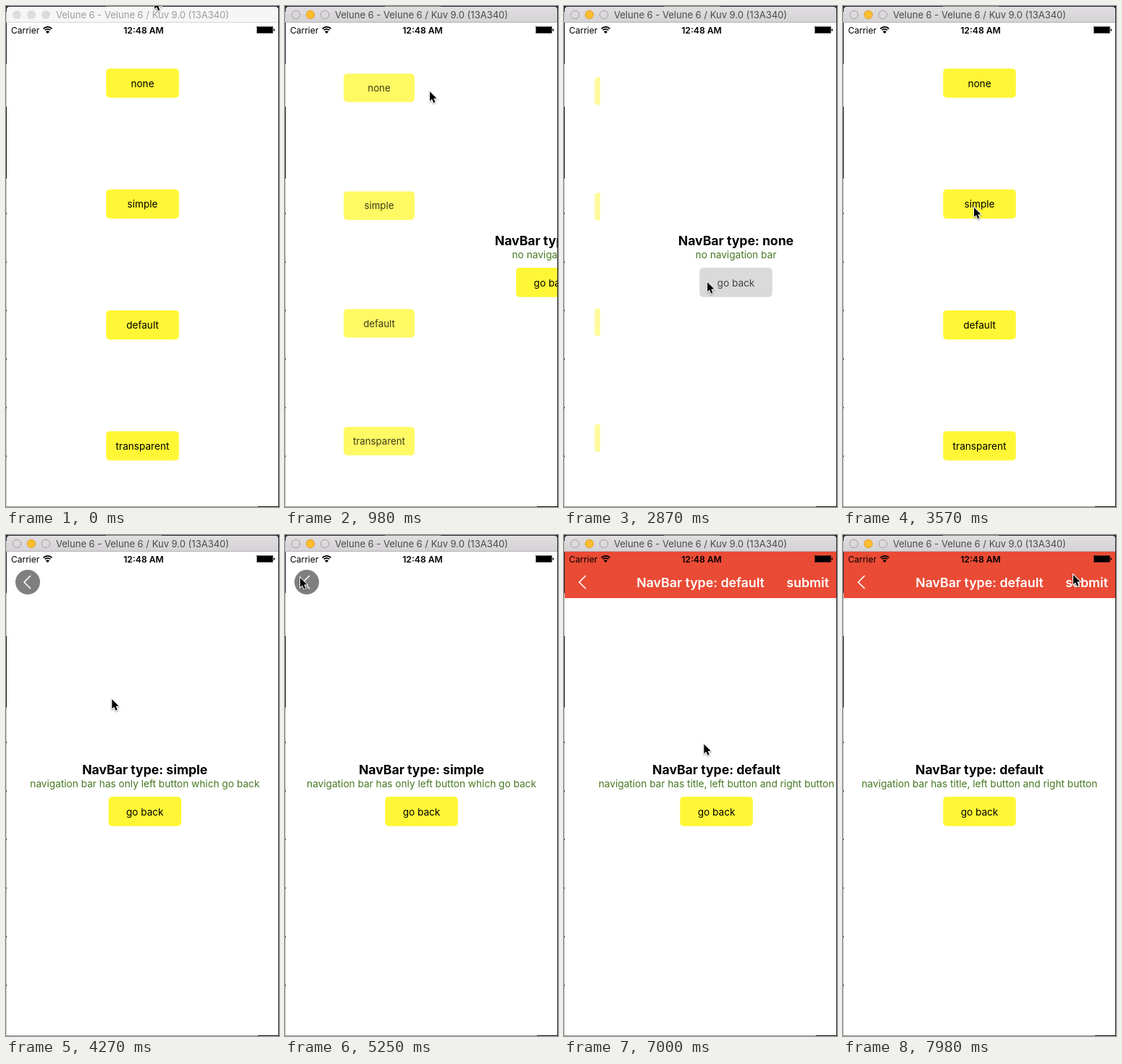
An HTML page with a canvas that plays this animation: 377 px wide and 691 px high, repeating every 8 s.

```html
<!DOCTYPE html>
<html lang="en">
<head>
<meta charset="utf-8">
<title>Navigation bar demo</title>
<style>
  html, body { margin: 0; width: 377px; height: 691px; overflow: hidden; background: #fff; }
  canvas { display: block; }
</style>
</head>
<body>
<canvas id="stage" width="377" height="691"></canvas>
<script>
const ctx = document.getElementById('stage').getContext('2d');
const LOOP = 8000, WIDTH = 376, MID_X = 188.5, MID_Y = 357, PRESS_TIME = 62;
const YELLOW = '#fff735', PRESSED = '#dadada', RED = '#ea4b35';

const menu = ['none', 'simple', 'default', 'transparent'];
const notes = {
  none: 'no navigation bar',
  simple: 'navigation bar has only left button which go back',
  default: 'navigation bar has title, left button and right button'
};
// A tap on a menu entry pushes its page, any other tap pops it.
const taps = [
  { at: 916.7, label: 'none' }, { at: 2853.2, label: 'go back' },
  { at: 3919, label: 'simple' }, { at: 5430, label: 'arrow' },
  { at: 6786, label: 'default' }
];
// Cursor trips: leave, arrive, x, y
const trips = [
  [90, 630, 200, 118], [1400, 1680, 197, 267], [1750, 2030, 180, 415],
  [2170, 2590, 198, 381], [2940, 3570, 181, 278], [4060, 4760, 22, 42],
  [4760, 5250, 21, 59], [5540, 5810, 203, 324], [5880, 6510, 178, 433],
  [6860, 7210, 221, 27], [7350, 7980, 318, 55]
];

// Overdamped spring from 0 to 1 that snaps when almost at rest.
function spring(ms) {
  const s = ms / 1000;
  const rest = 1.19 * Math.exp(-14 * s) - 0.19 * Math.exp(-67 * s);
  return rest < 0.006 ? 1 : 1 - rest;
}

function cursorAt(t) {
  let x = 205, y = -9;
  for (const [leave, arrive, toX, toY] of trips) {
    const u = Math.min(1, Math.max(0, (t - leave) / (arrive - leave)));
    const k = u * u * (3 - 2 * u);
    x += (toX - x) * k;
    y += (toY - y) * k;
  }
  return [x, y];
}

function rect(x, y, w, h, color) {
  ctx.fillStyle = color;
  ctx.fillRect(x, y, w, h);
}

function text(str, x, y, size, color = '#000', weight = 400, align = 'center') {
  ctx.font = `${weight} ${size}px Inter, sans-serif`;
  ctx.textAlign = align;
  ctx.fillStyle = color;
  ctx.fillText(str, x, y);
}

function disc(x, y, r, fill, stroke) {
  ctx.beginPath();
  ctx.arc(x, y, r, 0, 7);
  ctx.fillStyle = fill;
  ctx.fill();
  if (!stroke) return;
  ctx.strokeStyle = stroke;
  ctx.lineWidth = 1;
  ctx.stroke();
}

function chevron(x, y) {
  ctx.beginPath();
  ctx.moveTo(x + 9, y - 9);
  ctx.lineTo(x, y);
  ctx.lineTo(x + 9, y + 9);
  ctx.strokeStyle = '#fff';
  ctx.lineWidth = 1.6;
  ctx.stroke();
}

function button(label, y, t) {
  const down = taps.some(tap => tap.label === label && t >= tap.at && t < tap.at + PRESS_TIME);
  ctx.beginPath();
  ctx.roundRect(138.25, y, 100.5, 40.3, 5);
  ctx.fillStyle = down ? PRESSED : YELLOW;
  ctx.fill();
  text(label, MID_X, y + 25.4, 13.6, down ? '#444' : '#000');
}

function drawMenu(p, t) {
  ctx.save();
  ctx.globalAlpha = 1 - 0.63 * p ** 1.5;
  ctx.translate(MID_X - 0.3 * WIDTH * p, MID_Y);
  ctx.scale(1 - 0.05 * p, 1 - 0.05 * p);
  ctx.translate(-MID_X, -MID_Y);
  menu.forEach((label, i) => button(label, 86.2 + i * 166.75, t));
  ctx.restore();
}

function drawPage(name, p, t) {
  ctx.save();
  ctx.translate(WIDTH * (1 - p), 0);
  rect(1, 23, WIDTH, 667, '#fff');
  text('NavBar type: ' + name, MID_X, 330, 17.6, '#000', 700);
  text(notes[name], MID_X, 347.5, 13.65, '#457822');
  button('go back', 361.1, t);
  ctx.restore();
}

function drawNavBar(name) {
  if (name === 'simple') {
    disc(30, 65, 17, '#7f7f7f');
    chevron(25, 65);
  } else if (name === 'default') {
    rect(1, 23, 375, 64, RED);
    chevron(21, 65);
    text('NavBar type: default', MID_X, 72, 17.8, '#fff', 600);
    text('submit', 366, 72, 17.8, '#fff', 600, 'right');
  }
}

function drawStatus() {
  text('Carrier', 7, 37.5, 12, '#000', 400, 'left');
  text('12:48 AM', 190, 37.5, 12.2, '#000', 600);
  ctx.strokeStyle = '#000';
  ctx.lineWidth = 1.7;
  const from = -Math.PI * 0.76, to = -Math.PI * 0.24;
  for (const r of [8.2, 5.2]) {
    ctx.beginPath();
    ctx.arc(57.5, 37, r, from, to);
    ctx.stroke();
  }
  ctx.beginPath();
  ctx.moveTo(57.5, 38);
  ctx.arc(57.5, 38, 3.6, from, to);
  ctx.fillStyle = '#000';
  ctx.fill();
  ctx.lineWidth = 0.6;
  ctx.strokeRect(346.5, 28.5, 22, 9);
  rect(347, 29, 21, 8, '#000');
  rect(369.5, 31.5, 1.5, 3, '#000');
}

function drawWindow(active) {
  // Slivers of the desktop around the window
  rect(0, 0, 377, 691, '#c4c4c4');
  rect(0, 0, 377, 8, '#20242e');
  rect(138, 0, 77, 1, '#777');
  rect(376, 0, 1, 691, '#24262e');
  rect(0, 23, 1, 57, '#22242c');
  rect(0, 139, 1, 99, '#111');
  for (let y = 285; y < 640; y += 67) rect(0, y, 1, 2, '#333');
  rect(0, 690, 348, 1, '#999');
  rect(348, 690, 29, 1, '#111');

  ctx.beginPath();
  ctx.roundRect(1, 1, 375, 22, [4, 4, 0, 0]);
  const shade = ctx.createLinearGradient(0, 1, 0, 23);
  shade.addColorStop(0, active ? '#e0dee0' : '#f6f6f6');
  shade.addColorStop(1, active ? '#d4d2d4' : '#f6f6f6');
  ctx.fillStyle = shade;
  ctx.fill();
  rect(1, 22, 375, 1, active ? '#b4b2b4' : '#d6d6d6');
  for (let i = 0; i < 3; i++) {
    const x = 15 + i * 20;
    if (!active) disc(x, 12, 6, '#dcdcdc');
    else if (i === 1) disc(x, 12, 5.7, '#fdbd2f', '#e0a032');
    else disc(x, 12, 5.7, '#dbd9db', '#a2a0a2');
  }
  text('Velune 6 - Velune 6 / Kuv 9.0 (13A340)', MID_X, 17, 13, active ? '#4b4b4b' : '#9c9c9c');
  rect(1, 23, 375, 667, '#fff');
}

function drawCursor([x, y]) {
  ctx.save();
  ctx.translate(x, y);
  ctx.lineWidth = 2;
  ctx.strokeStyle = '#fff';
  ctx.shadowColor = 'rgba(0,0,0,.4)';
  ctx.shadowBlur = 2;
  ctx.shadowOffsetY = 1;
  const arrow = new Path2D('M0 0V13L3 10.3 5.2 15.4 7.4 14.4 5.3 9.5 9.3 9.3Z');
  ctx.stroke(arrow);
  ctx.shadowColor = 'transparent';
  ctx.fillStyle = '#000';
  ctx.fill(arrow);
  ctx.restore();
}

function drawApp(t) {
  const i = taps.filter(tap => tap.at <= t).length - 1;
  if (i < 0) return drawMenu(0, t);
  const push = taps[i].label in notes;
  const name = taps[push ? i : i - 1].label;
  const k = spring(t - taps[i].at), p = push ? k : 1 - k;
  drawMenu(p, t);
  if (p > 0) drawPage(name, p, t);
  if (push) drawNavBar(name);
}

function draw(now) {
  const t = now % LOOP;
  drawWindow(t >= 700);
  ctx.save();
  ctx.beginPath();
  ctx.rect(1, 23, 375, 667);
  ctx.clip();
  drawApp(t);
  drawStatus();
  ctx.restore();
  drawCursor(cursorAt(t));
  requestAnimationFrame(draw);
}
requestAnimationFrame(draw);
</script>
</body>
</html>
```
